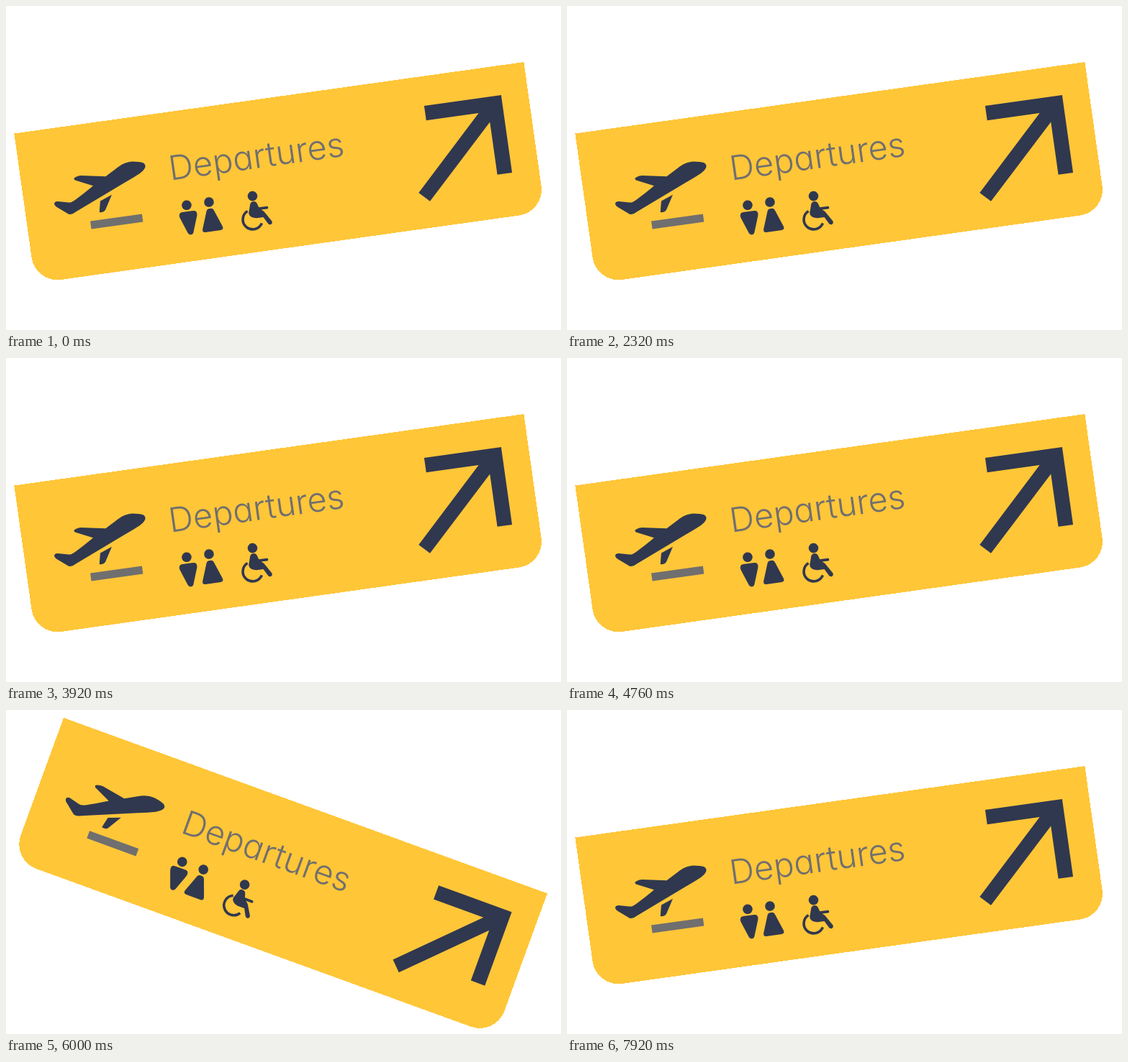
An HTML page that plays this animation: 771 px wide and 451 px high, repeating every 8000 ms.

```html
<!DOCTYPE html>
<html lang="en">
<head>
<meta charset="utf-8">
<title>Departures sign</title>
<style>
  html, body { margin: 0; width: 100%; height: 100%; overflow: hidden; background: #fff; }
  svg { display: block; width: 771px; height: 451px; }
  .board { fill: #ffc638; shape-rendering: crispEdges; }
  .navy { fill: #30384f; }
  .line { fill: none; stroke: #30384f; stroke-width: 3.6; }
  .gray { fill: #706f6f; }
  text {
    font: 300 47px Inter, "Open Sans", sans-serif;
    font-optical-sizing: none;
    font-feature-settings: "cv11";
    letter-spacing: 0.1px;
  }
</style>
</head>
<body>
<svg viewBox="0 0 771 451">
  <g id="sign" transform="translate(380 232) rotate(-8) translate(-357.5 -105.25)">
    <path class="board" d="M0 0H715V174.2A36.3 36.3 0 0 1 678.7 210.5H36.3A36.3 36.3 0 0 1 0 174.2Z"/>

    <!-- plane and runway -->
    <g class="navy" transform="rotate(8) translate(-11.35 -177.55)">
      <path d="M72 272L87 273.6Q91 273.8 96 270Q109 260.5 121 250.3L96 242.6Q93 240.6 96 238.6
        Q99.5 236.3 104 236.1L138.5 237.2L157 223.2Q165.5 217.2 175 216.6Q185 216.5 190.5 218.3
        Q195 220.8 193 225.4Q191 229.6 186 232.9Q177 238.8 165 245.8L97 286.4Q91.5 290.6 87 289.8
        L69.5 279.3Q66.3 277 67.3 274Q68.8 271.6 72 272Z"/>
      <path d="M131 271.6L147 262.8L138.2 283.6Q136.6 286.6 133.5 287L129.8 287.2L130.2 281Z"/>
    </g>
    <rect class="gray" x="87.7" y="135.6" width="72.5" height="11"/>

    <text class="gray" x="206" y="94.8">Departures</text>

    <!-- man, woman, wheelchair user -->
    <g class="navy">
      <circle cx="223.4" cy="132.1" r="6.8"/>
      <path d="M216 141H231.5Q236.2 141.2 236 146Q235.9 148 235.1 150L227.6 170.5
        Q226.5 173.6 223.6 173.6Q220.7 173.6 219.6 170.5L212.2 150Q211.4 148 211.3 146Q211.2 141.2 216 141Z"/>
      <circle cx="254.7" cy="132.2" r="6.8"/>
      <path d="M253 141.2H256.4Q258.8 141.4 259.8 144L268.6 168Q270 172.8 265.4 173H244
        Q239.4 172.8 240.8 168L249.6 144Q250.6 141.4 253 141.2Z"/>
      <circle cx="315.8" cy="132.3" r="6.8"/>
      <path d="M315 139.8Q319.6 139.8 320.8 144L322.4 149.6L326 153.4Q329.4 156 330.6 159
        L337.6 170.6Q338.4 173.6 335.8 174.8Q333 175.4 331.6 172.8L326.6 163.4H317
        Q308.4 161.8 307.4 156.8Q307 154 308.4 151.4L311 143Q312 140 315 139.8Z"/>
    </g>
    <path class="line" stroke-linecap="round" d="M320 150.8L333.4 151"/>
    <path class="line" d="M306 152A13.7 13.7 0 1 0 323.3 171.5"/>

    <!-- arrow -->
    <path class="navy" d="M569.4 41.1H677.4V150.2H656.7V76L558.9 173.8L545 159.9L643 61.6H569.4Z"/>
  </g>
</svg>
<script>
  const LOOP = 8000;
  const flips = [360, 760, 1160, 1560, 1920, 2320, 2720, 3120, 3520, 3920,
                 4360, 4760, 5200, 5600, 6000, 6400, 6720, 7120, 7520, 7920];
  const sign = document.getElementById("sign");

  function draw() {
    const t = performance.now() % LOOP;
    const count = flips.filter(time => time <= t).length;
    const angle = count % 2 ? 20 : -8;
    sign.setAttribute("transform",
      `translate(380 232) rotate(${angle}) translate(-357.5 -105.25)`);
    requestAnimationFrame(draw);
  }
  draw();
</script>
</body>
</html>
```
